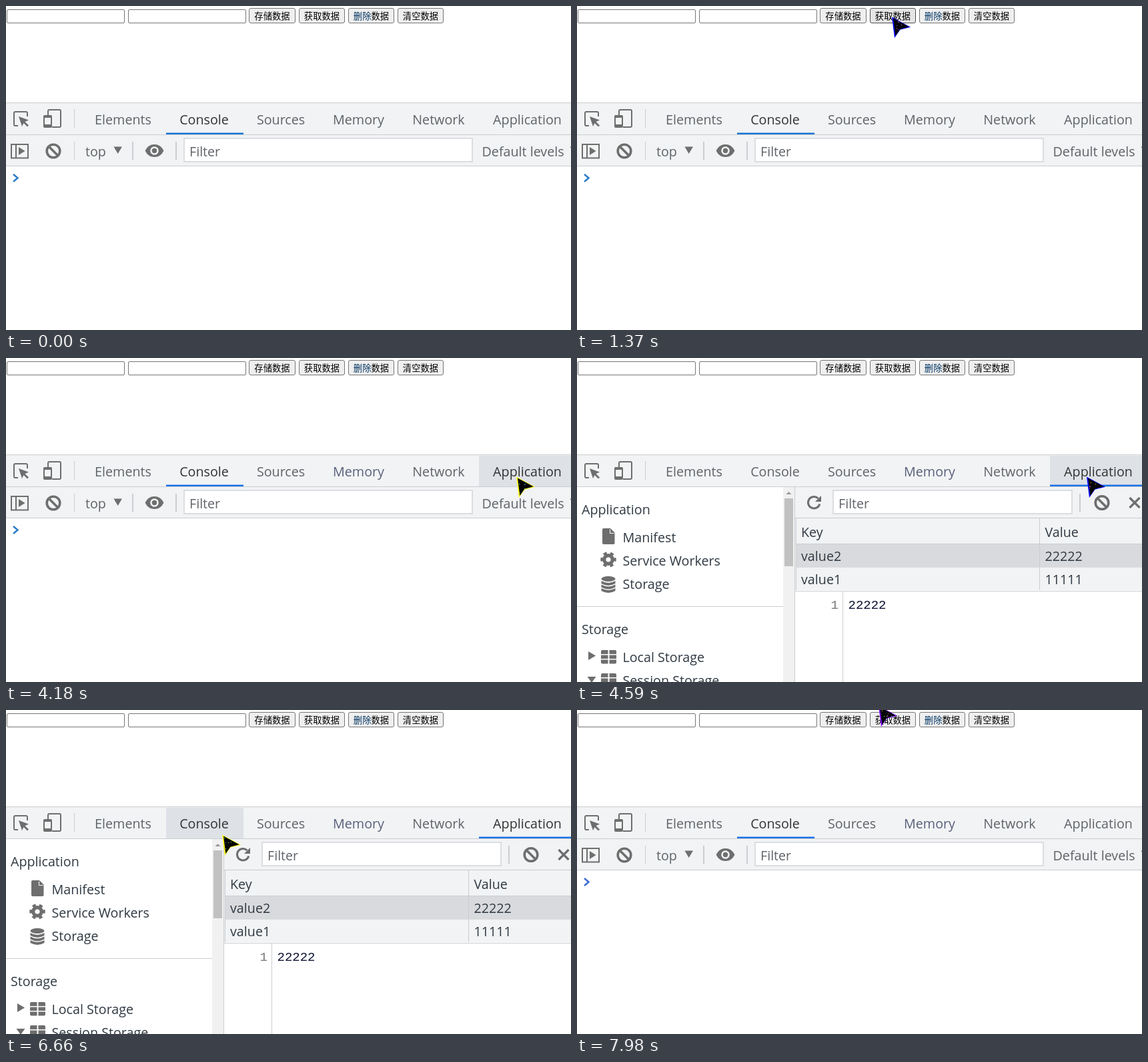
An HTML page for the animation above (8000 ms loop, 847 by 487 pixels).

```html
<!DOCTYPE html>
<html lang="zh">
<head>
<meta charset="utf-8">
<title>Session storage</title>
<style>
html, body { margin: 0; width: 847px; height: 487px; overflow: hidden; background: #fff; }
svg { display: block; }
text { font: 19.7px "Open Sans", "Noto Sans", sans-serif; fill: #303942; }
.grey, .tab text { fill: #5f6368; }
.tab { text-anchor: middle; }
.tab rect { fill: none; }
.tab.hover rect { fill: #dee1e6; }
.tab.on text, .tab.hover text { fill: #333; }
.tab.tint:not(.hover) text { fill: #5a607c; }
.tab .bar { fill: none; }
.tab.on .bar { fill: #1a73e8; }
.button text { font: 13.33px "Noto Sans CJK SC", "Noto Sans CJK", sans-serif; text-anchor: middle; fill: #000; }
.button rect { fill: #efefef; stroke: #767676; }
.button.hover rect { fill: #e5e5e5; stroke: #4f4f4f; }
.button .blue { fill: #00345f; }
.field { fill: #fff; stroke: #767676; }
.filter { fill: #fff; stroke: #dcdde0; stroke-width: 2; }
.bg { fill: #f1f3f4; }
.line { fill: #cacdd1; }
.icon { fill: #6e6e6e; }
.stroke { fill: none; stroke: #6e6e6e; stroke-width: 2; }
.code { font: 19px "Liberation Mono", "Noto Sans Mono", monospace; }
</style>
</head>
<body>
<svg width="847" height="487" viewBox="0 0 847 487">
  <defs>
    <g id="block" class="stroke" style="stroke-width:3.6">
      <circle r="9.8"/><path d="M-7-7 7 7"/>
    </g>
    <path id="grid" class="icon" d="M2 0h8.500v6h-10.500v-4q0-2 2-2zM12.500 0h8.500q2 0 2 2v4h-10.500zM0 7.500h10.500v5.500h-10.500zM12.500 7.500h10.500v5.500h-10.500zM0 14.500h10.500v6h-8.500q-2 0-2-2zM12.500 14.500h10.500v4q0 2-2 2h-8.500z"/>
    <path id="arrow" d="M0 0 25 13.500 11 17 3.500 28z"/>
    <clipPath id="inArrow"><use href="#arrow"/></clipPath>
  </defs>

  <rect class="field" x="1.5" y="5.500" width="176" height="20" rx="1.500"/>
  <rect class="field" x="183.500" y="5.500" width="176" height="20" rx="1.500"/>
  <g id="buttons"></g>

  <rect class="bg" y="146" width="847" height="47"/>
  <rect class="line" y="145" width="847" height="1"/>
  <g id="tabs"></g>
  <rect class="line" y="193" width="847" height="1"/>
  <g id="tabIcons">
    <path class="stroke" d="M18 180h-4q-2 0-2-2v-17q0-2 2-2h16q2 0 2 2v5"/>
    <path class="icon" d="M19 166 34 171.500 28.500 174 34 179.500 32 181.500 26.500 176 24 181z"/>
    <path class="stroke" d="M63 164v-6q0-2 2-2h15q2 0 2 2v22q0 2-2 2h-11"/>
    <rect class="stroke" x="57" y="165" width="11" height="17" rx="1"/>
    <path class="icon" d="M57 164h11v4h-11zM57 178h11v4h-11z"/>
    <rect class="line" x="102" y="155" width="1" height="28"/>
  </g>

  <g id="console">
    <rect class="bg" y="194" width="847" height="46"/>
    <rect class="line" y="240" width="847" height="1"/>
    <path class="stroke" d="M8 208h25v20.500h-25zM15 208v20.500"/>
    <path class="icon" d="M19 212 28.500 218 19 224z"/>
    <use href="#block" x="71" y="218"/>
    <text class="grey" x="119" y="226">top</text>
    <path class="icon" d="M161.500 211.500h12.500L167.700 222zM845.500 211.500h12.500L851.700 222z"/>
    <path class="line" d="M102 204h1v27h-1zM189 204h2v27h-2zM254 204h2v27h-2z"/>
    <path class="icon" d="M208.500 217.500Q213 208 222.500 208T236.500 217.500Q232 227 222.500 227T208.500 217.500z"/>
    <circle cx="222.500" cy="217.500" r="5" fill="#6e6e6e" stroke="#f1f3f4" stroke-width="2.600"/>
    <rect class="filter" x="267" y="199" width="432" height="35"/>
    <text class="grey" x="275" y="226">Filter</text>
    <text class="grey" x="713.500" y="226">Default levels</text>
    <path id="prompt" d="M11 253 17.500 258.500 11 264" fill="none" stroke-width="2.500"/>
    <rect id="caret" x="34" y="249" width="1" height="20" fill="#222"/>
  </g>

  <g id="application">
    <text x="7" y="235">Application</text>
    <path class="icon" d="M40 256h10l6.500 6.500v15.500q0 2-2 2h-14.500q-2 0-2-2v-20q0-2 2-2z"/>
    <path d="M49.500 257.500v6h6" fill="none" stroke="#fff"/>
    <text x="68.500" y="277">Manifest</text>
    <g class="stroke" transform="translate(47 303)">
      <circle r="6.300" style="stroke-width:5.400"/>
      <circle r="9.800" style="stroke-width:4;stroke-dasharray:5.130" transform="rotate(-15)"/>
    </g>
    <text x="68.500" y="312">Service Workers</text>
    <g class="icon">
      <ellipse cx="47" cy="332" rx="10.500" ry="4"/>
      <path id="disc" d="M36.500 335q10.500 6 21 0v4q-10.500 6-21 0z"/>
      <use href="#disc" y="5.500"/><use href="#disc" y="11"/>
    </g>
    <text x="68.500" y="347">Storage</text>
    <rect class="line" y="373" width="309" height="1"/>
    <text x="7" y="415">Storage</text>
    <path class="icon" d="M17 441 28 447.500 17 454zM15.500 479h13L22 488z"/>
    <use href="#grid" x="36" y="439"/><use href="#grid" x="36" y="474"/>
    <text x="68.500" y="457">Local Storage</text>
    <text x="68.500" y="492">Session Storage</text>

    <rect x="309" y="194" width="17" height="293" fill="#f1f1f1"/>
    <rect x="311" y="211" width="13" height="102" fill="#c1c1c1"/>
    <path d="M313.500 205 317.500 201 321.500 205z" fill="#999"/>
    <rect class="line" x="326" y="194" width="1" height="293"/>

    <rect class="bg" x="327" y="194" width="520" height="155"/>
    <path class="stroke" style="stroke-width:3" d="M361.500 211A8.800 8.800 0 1 0 363.800 219.500"/>
    <path class="icon" d="M366 207v9h-9z"/>
    <rect class="filter" x="384" y="199" width="358" height="35"/>
    <text class="grey" x="392" y="226">Filter</text>
    <rect class="line" x="753" y="204" width="2" height="27"/>
    <use href="#block" x="787" y="217.500"/>
    <path class="stroke" style="stroke-width:3.200" d="M828.500 210 843.500 225M843.500 210 828.500 225"/>
    <rect x="328" y="280" width="519" height="35" fill="#d9dadd"/>
    <path class="line" d="M327 240h520v1h-520zM328 279h519v1h-519zM327 350h520v1h-520zM693 241h1v108h-1zM328 241h1v108h-1zM398 351h1v136h-1z"/>
    <text x="336" y="269">Key</text><text x="701.500" y="269">Value</text>
    <text x="336" y="305">value2</text><text x="701.500" y="305">22222</text>
    <text x="336" y="340">value1</text><text x="701.500" y="340">11111</text>
    <text class="code" x="380.500" y="377" style="fill:#777">1</text>
    <text class="code" x="406.500" y="377" style="fill:#0b1030">22222</text>
  </g>

  <g id="cursor">
    <use id="glow" href="#arrow" stroke-width="1.500"/>
    <use href="#arrow" fill="#050508" transform="translate(1 .5) scale(.95)"/>
    <g id="specks" clip-path="url(#inArrow)"></g>
  </g>
</svg>

<script>
const LOOP = 8000;
const $ = id => document.getElementById(id);

// Pointer stops: [step, x, y]
const FIRST = [[0, 480, 309], [1, 462, 262], [2, 434, 200], [3, 424, 125], [4, 408, 58],
  [6, 356, 38], [8, 380, 16], [11, 466, 20], [15, 473, 18], [17, 484, 32], [19, 500, 98],
  [20, 520, 160], [21, 575, 199], [22, 660, 188], [23, 762, 179], [25, 767, 179]];
const SECOND = [[0, 766, 180], [8, 765, 180], [10, 735, 265], [11, 700, 290], [14, 450, 310],
  [16, 336, 325], [18, 360, 386], [20, 540, 350], [22, 728, 328], [24, 732, 314],
  [26, 650, 350], [28, 500, 355], [31, 336, 320], [33, 345, 250], [35, 338, 198],
  [38, 298, 170], [44, 292, 168], [47, 294, 170], [49, 335, 192], [50, 420, 199],
  [51, 495, 192], [53, 485, 90], [55, 453, -5]];

const buttons = [["存储数据", 364, 70], ["获取数据", 439, 69], ["删除数据", 513, 69], ["清空数据", 587, 69]]
  .map(([label, x, w], i) => {
    const text = i === 2 ? '<tspan class="blue">删除</tspan>数据' : label;
    return addHotspot("buttons", "button", { x, y: 3, w, h: 23 },
      `<rect x="${x + .5}" y="3.500" width="${w - 1}" height="22" rx="2.500"/>
       <text x="${x + w / 2}" y="20">${text}</text>`);
  });

const tabs = [["Elements", 114, 125, 175.5], ["Console", 240, 116, 297], ["Sources", 356, 113, 412],
  ["Memory", 469, 119, 528.5], ["Network", 588, 121, 648.5], ["Application", 709, 138, 781.5]]
  .map(([label, x, w, mid]) => addHotspot("tabs", "tab", { x, y: 147, w, h: 46 },
    `<rect x="${x}" y="147" width="${w}" height="46"/><text x="${mid}" y="178">${label}</text>
     <rect class="bar" x="${x}" y="190.500" width="${w}" height="3"/>`));
const [, consoleTab, , memoryTab, , appTab] = tabs;

function addHotspot(parent, name, box, markup) {
  const el = document.createElementNS("http://www.w3.org/2000/svg", "g");
  el.setAttribute("class", name);
  el.innerHTML = markup;
  $(parent).append(el);
  return { el, box };
}

function along(stops, step) {
  const i = Math.max(1, stops.findIndex(s => s[0] >= step));
  const [a, ax, ay] = stops[i - 1], [b, bx, by] = stops[i];
  const p = (step - a) / (b - a);
  return [Math.round(ax + (bx - ax) * p), Math.round(ay + (by - ay) * p)];
}

const random = seed => {
  const v = Math.sin(seed * 12.9898) * 43758.5453;
  return v - Math.floor(v);
};

function paintCursor(pos, seed) {
  $("cursor").style.display = pos ? "" : "none";
  if (!pos) return;
  $("cursor").setAttribute("transform", `translate(${pos})`);
  const hue = (60 + 30 * seed) % 360, colour = `hsl(${hue} 100% 50%)`;
  $("glow").setAttribute("fill", colour);
  $("glow").setAttribute("stroke", colour);
  let dots = "";
  for (let i = 0; i < 9; i++) {
    const r = seed * 31 + i * 3, x = 1 + random(r) * 18, y = 3 + random(r + 1) * 20;
    dots += `<rect x="${x | 0}" y="${y | 0}" width="1" height="1"
      fill="hsl(${hue + random(r + 2) * 200} 90% 65%)"/>`;
  }
  $("specks").innerHTML = dots;
}

function show(id, on) { $(id).style.display = on ? "" : "none"; }

let last;
function render(t) {
  const early = t < 4180;
  const step = early ? Math.floor((t - 330) / 69.6 + .1) : Math.floor((t - 4180) / 69.09 + .15);
  const key = early + ":" + step;
  if (key === last) return;
  last = key;

  const hidden = early && (t < 330 || step >= 25);
  const pos = hidden ? null : along(early ? FIRST : SECOND, step);
  const inApp = !early && step >= 2 && step < 46;
  const back = !early && step >= 46;

  show("console", !inApp);
  show("application", inApp);
  show("caret", back && step < 54);
  $("prompt").setAttribute("stroke", back ? "#3f6bd0" : "#2b7cc9");
  consoleTab.el.querySelector(".bar").style.fill = early ? "#1976d2" : "";
  consoleTab.el.classList.toggle("on", !inApp);
  appTab.el.classList.toggle("on", inApp);
  memoryTab.el.classList.toggle("tint", !early || step >= 20);
  if (inApp) consoleTab.el.querySelector(".bar").style.fill = "none";

  for (const { el, box } of [...buttons, ...tabs]) {
    const over = pos && pos[0] >= box.x && pos[0] < box.x + box.w &&
      pos[1] >= box.y && pos[1] < box.y + box.h;
    el.classList.toggle("hover", !!over);
  }
  paintCursor(pos, early ? step + 3 : step);
}

const start = performance.now();
function tick() {
  render((performance.now() - start) % LOOP);
  requestAnimationFrame(tick);
}
tick();
</script>
</body>
</html>
```
